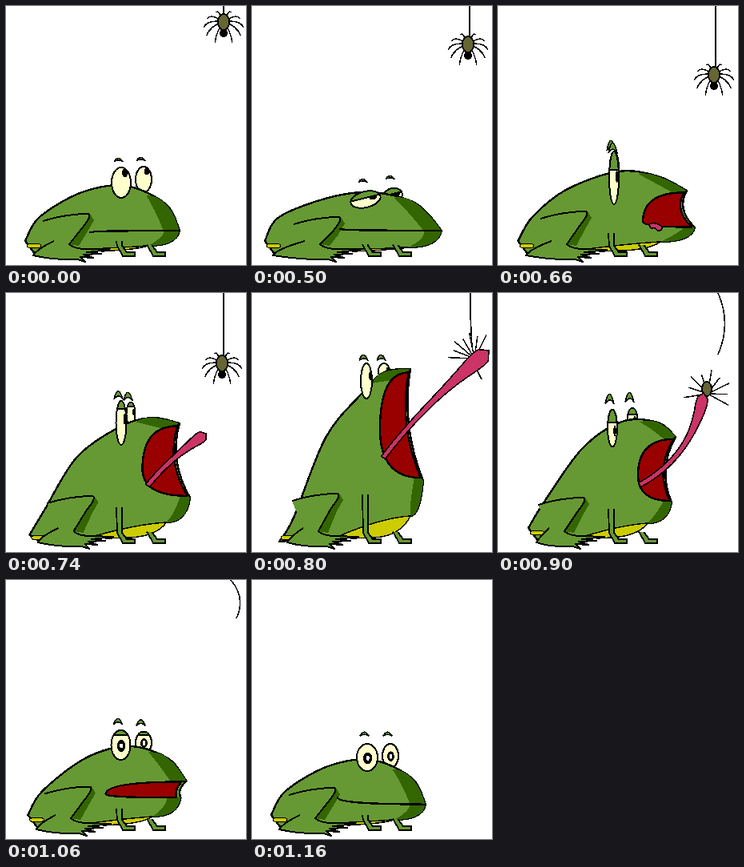
An HTML page for the animation above (2.76 s loop, 300x324 px).

```html
<!DOCTYPE html>
<html lang="en">
<head>
<meta charset="utf-8">
<title>Frog and spider</title>
<style>
html, body { margin: 0; width: 100%; height: 100%; overflow: hidden; background: #fff; }
svg { display: block; width: 100vw; height: 100vh; }
</style>
</head>
<body>
<svg id="stage" viewBox="0 0 300 324" shape-rendering="crispEdges" stroke-linejoin="round"></svg>
<script>
const GREEN = '#669933', DARK = '#336600', CREAM = '#ffffcc', YELLOW = '#cccc00',
      RED = '#990000', PINK = '#cc3366', OLIVE = '#666633', LOOP = 2760;

const lerp = (a, b, t) => a + (b - a) * t;
const mix = (p, q, t) => p.map((v, i) => lerp(v, q[i], t));
const shift = ([x, y], dx, dy) => [x + dx, y + dy];
const range = n => [...Array(n).keys()];

const path = (d, fill = 'none', width = 2) =>
  `<path d="${d}" fill="${fill}" stroke="${width ? '#000' : 'none'}" stroke-width="${width}"/>`;
const oval = (x, y, rx, ry, fill, width = 0) =>
  `<ellipse cx="${x}" cy="${y}" rx="${rx}" ry="${ry}" fill="${fill}" stroke="${width ? '#000' : 'none'}" stroke-width="${width}"/>`;

// Smooth open curve through the points.
function spline(p) {
  const at = i => p[Math.max(0, Math.min(p.length - 1, i))];
  return 'M' + p[0] + p.slice(1).map((end, i) => {
    const out = p[i].map((v, k) => v + (end[k] - at(i - 1)[k]) / 6);
    const into = end.map((v, k) => v - (at(i + 2)[k] - p[i][k]) / 6);
    return `C${out} ${into} ${end}`;
  }).join('');
}

// Halfway between two poses, for the parts both have.
function between(a, b) {
  if (typeof a === 'number') return (a + b) / 2;
  if (Array.isArray(a)) return a.map((v, i) => between(v, b[i]));
  return Object.fromEntries(Object.keys(a).filter(k => k in b).map(k => [k, between(a[k], b[k])]));
}

// Joints of the frog. look: pupil offset and size relative to the eye;
// frown: lift and height of the brows; tongue: root, bend, tip and bulb size.
const rest = {
  heel: [24, 294], knee: [105, 260], belly: [178, 300],
  back: [[95, 233], [150, 225], [200, 248]],
  lip: [217, 281], jaw: [217, 281], hinge: [105, 283],
  eyes: [[144, 221, 12, 19], [172, 217, 10, 16]],
  look: [.4, -.65, .3], lid: 0, tilt: 0, frown: [10, 5]
};
const calm = { ...rest,
  hinge: [107, 272],
  eyes: [[144, 222, 13, 17], [173, 220, 10, 15]],
  look: [.05, .05, .43], frown: [13, 6]
};
const crouch = { ...rest,
  heel: [16, 294], knee: [111, 264], belly: [195, 302],
  back: [[95, 240], [150, 233], [205, 247]],
  lip: [237, 281], jaw: [237, 281], hinge: [110, 279],
  eyes: [[142, 242, 19, 10], [176, 237, 12, 9]],
  look: [.5, 0, .25], lid: .4, tilt: -14, frown: [14, 5]
};
const gape = { ...rest,
  heel: [25, 294], knee: [112, 257], belly: [203, 295],
  back: [[85, 230], [150, 207], [200, 213]],
  lip: [236, 231], jaw: [246, 277], hinge: [181, 270],
  eyes: [[145, 215, 6, 33], [147, 205, 4, 20]],
  look: [.6, -.05, .25], lid: .35, frown: [9, 16],
  tongue: [[190, 276], [196, 272], [204, 280]], bulb: 2
};
const leap = { ...rest,
  heel: [34, 311], knee: [109, 251], belly: [198, 279],
  back: [[92, 181], [136, 127], [165, 99]],
  lip: [198, 95], jaw: [214, 235], hinge: [160, 170],
  eyes: [[143, 110, 7, 22], [165, 98, 7, 10]],
  look: [.7, -.3, .25], frown: [8, 9],
  tongue: [[164, 206], [212, 142], [296, 72]], bulb: 15
};
const pull = { ...rest,
  heel: [38, 294], knee: [109, 256], belly: [187, 288],
  back: [[105, 195], [155, 161], [200, 162]],
  lip: [222, 180], jaw: [217, 262], hinge: [175, 228],
  eyes: [[143, 169, 6, 23], [168, 156, 6, 12]],
  look: [.5, .15, .3], lid: .35, frown: [15, 15],
  tongue: [[177, 240], [244, 204], [257, 125]], bulb: 9
};
const gulp = { ...rest,
  heel: [31, 294], knee: [109, 257], belly: [188, 292],
  back: [[105, 212], [158, 191], [205, 198]],
  lip: [234, 222], jaw: [220, 264], hinge: [142, 264],
  eyes: [[143, 191, 11, 20], [171, 187, 10, 13]],
  look: [.05, .05, .43], lid: .33, frown: [11, 12],
  tongue: [[150, 262], [165, 247], [193, 241]], bulb: 4
};

function eye([x, y, rx, ry], { look: [dx, dy, size], lid, tilt }) {
  const px = x + dx * rx, py = y + dy * ry, edge = 2 * lid - 1;
  let out = oval(x, y, rx, ry, CREAM, 2) + oval(px, py, rx * size, ry * size, '#000');
  if (size > .36) out += oval(px, py, 2, 3, '#fff');
  if (lid) {
    const w = rx * Math.sqrt(1 - edge * edge);
    out += path(`M${x - w},${y + edge * ry}A${rx},${ry} 0 0 1 ${x + w},${y + edge * ry}Z`, GREEN);
  }
  return `<g transform="rotate(${tilt} ${x} ${y})">${out}</g>`;
}
const brow = ([x, y, , ry], [lift, h]) =>
  path(`M${x - 9},${y - ry - lift + h / 2}q5,${-h * 1.6} 11,0q-5,${-h * .6} -11,0`, GREEN, 1.5);

const limb = (x, top) =>
  path(`M${x},${top}L${x + 1},300L${x + 8},313h15v-5h-10L${x + 7},300V${top}`, GREEN, 1.8);

function hindLeg([kx, ky], [hx, hy]) {
  const toes = range(4).map(i => `L${kx + 24 - 10 * i},${305 + 5 * i}L${kx - 4 - 4 * i},${308 + 3 * i}`).join('');
  const shin = `Q${kx + 3},${ky + 2} ${kx - 10},${ky + 18}L${kx - 26},298`;
  const outline = `M${kx - 59},${ky + 9}Q${kx - 30},${ky} ${kx - 2},${ky}${shin}Q${kx - 20},304 ${kx - 4},304`
    + `${toes}Q${kx - 45},318 ${hx + 10},312Q${hx + 15},304 ${kx - 45},294`;
  return path(`M${kx},${ky}L${kx + 5},${ky + 8}L${kx - 3},${ky + 22}L${kx - 14},300L${kx - 26},298L${kx - 10},${ky + 18}Z`, DARK, 0)
    + oval(hx + 11, Math.min(hy + 6, 306), 9, 3, YELLOW, 1)
    + path(outline, GREEN, 0) + path(outline);
}

// A tapering ribbon along a bent line, swelling towards its tip.
function ribbon([root, bend, tip], bulb) {
  const n = 24, sides = [[], []];
  for (const i of range(n + 1)) {
    const t = i / n, a = mix(root, bend, t), b = mix(bend, tip, t), [x, y] = mix(a, b, t);
    const angle = Math.atan2(b[1] - a[1], b[0] - a[0]);
    const w = (3 + bulb * t ** 5) * Math.sqrt(1 - t ** 12);
    sides[0].push([x - w * Math.sin(angle), y + w * Math.cos(angle)]);
    sides[1].unshift([x + w * Math.sin(angle), y - w * Math.cos(angle)]);
  }
  return path('M' + sides.flat().join('L') + 'Z', PINK, 1.6);
}

function frog(p) {
  const { heel, knee, belly, back, lip, jaw, hinge } = p, [, crown, front] = back;
  const gap = jaw[1] - lip[1];
  const notch = shift(mix(lip, jaw, .5), -Math.min(gap * .4, 20), 0);
  const chin = [jaw[0] - 4, belly[1]];
  const body = spline([heel, shift(heel, 18, -30), ...back, lip])
    + `Q${notch} ${jaw}Q${chin} ${belly}L${knee[0] + 15},306L${heel[0] + 12},310Z`;

  const start = mix(crown, front, .5), end = mix(lip, hinge, .18);
  const rim = front.map((v, k) => 2 * v - (start[k] + lip[k]) / 2);
  const shade = `M${start}Q${mix(front, hinge, .15)} ${end}L${lip}Q${rim} ${start}`;
  const underside = `M${jaw}Q${chin} ${belly}Q${shift(chin, -14, -12)} ${mix(jaw, hinge, .18)}Z`;

  const upper = mix(lip, hinge, .06), lower = mix(jaw, hinge, .06);
  const mouth = `M${hinge}Q${hinge[0]},${upper[1]} ${upper}Q${shift(notch, -3, 0)} ${lower}Q${hinge[0]},${lower[1]} ${hinge}Z`;
  const belt = `M${knee[0]},304Q${mix(knee, belly, .6)[0]},${belly[1] + 2} ${belly}Q${belly[0] - 12},304 ${belly[0] - 45},306L${knee[0] + 15},307Z`;

  return p.eyes.map(e => brow(e, p.frown)).join('') + eye(p.eyes[1], p)
    + path(body, GREEN, 2.4) + path(shade, DARK, 0) + path(underside, DARK, 0)
    + path(belt, YELLOW, 1.5) + limb(138, 298 - 2 * (302 - belly[1])) + limb(176, 299)
    + hindLeg(knee, heel) + path(mouth, RED, 2.4) + path(`M${upper}L${lip}`)
    + (p.tongue ? ribbon(p.tongue, p.bulb) : '') + eye(p.eyes[0], p);
}

const thread = d => path(d, 'none', 1.6);

function spider(x, y) {
  const legs = [-1, 1].flatMap(side => range(5).map(i => {
    const a = -1.2 + i * .58, c = side * Math.cos(a), s = 14 * Math.sin(a);
    return path(`M0,0Q${c * 19},${s - 3} ${c * 25},${s + 1 + 3 * i}`, 'none', 1.5);
  })).join('');
  return thread(`M272,0V${y - 9}`) + `<g transform="translate(${x} ${y})">${legs}`
    + oval(0, 0, 7, 10, OLIVE, 2) + oval(0, 14, 5, 5, '#000') + '</g>';
}

// Legs sticking out around the tip of the tongue.
const fan = (x, y, reach, from, to, n) => range(n).map(i => {
  const a = lerp(from, to, i / (n - 1)), r = reach - 5 * (i % 2);
  return path(`M${x},${y}L${x + r * Math.cos(a)},${y + r * Math.sin(a)}`, 'none', 1.5);
}).join('');

const caught = thread('M273,0V27L275,68') + fan(278, 82, 33, -3.1, -1.1, 7)
  + path('M278,90L287,108') + oval(271, 98, 6, 5, '#000');
const carried = thread('M275,0Q292,38 275,77') + fan(262, 126, 30, -3.3, .5, 9)
  + oval(261, 120, 6, 9, OLIVE, 2);

const scenes = [
  [0, spider(272, 20) + frog(rest)],
  [500, spider(270, 48) + frog(crouch)],
  [580, spider(270, 67) + frog(between(crouch, gape))],
  [660, spider(270, 86) + frog(gape)],
  [740, spider(270, 88) + frog(between(gape, leap))],
  [800, caught + frog(leap)],
  [900, carried + frog(pull)],
  [980, thread('M278,0Q305,35 277,68') + frog(gulp)],
  [1060, thread('M281,0Q300,22 288,48') + frog(between(gulp, calm))],
  [1160, frog(calm)]
];

const stage = document.getElementById('stage');
let shown;
function tick() {
  const t = performance.now() % LOOP;
  const scene = scenes.filter(([start]) => start <= t).pop();
  if (scene !== shown) {
    stage.innerHTML = scene[1];
    shown = scene;
  }
  requestAnimationFrame(tick);
}
tick();
</script>
</body>
</html>
```
